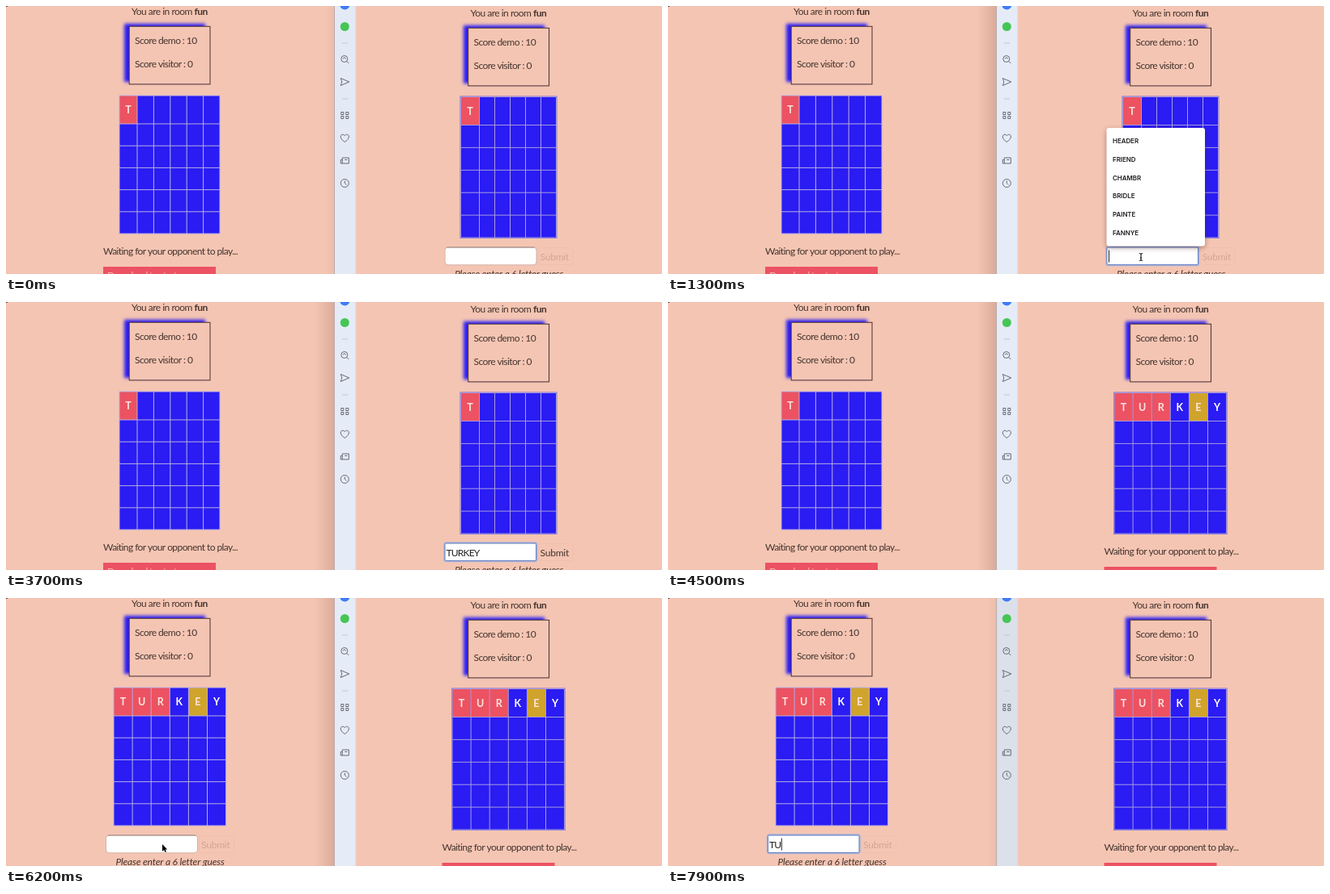
Write an HTML page with a canvas that moves like this. It is 810 by 332 pixels and loops after 8 s.

```html
<!DOCTYPE html>
<html lang="en">
<head>
<meta charset="utf-8">
<title>Word game</title>
<style>
html, body { margin: 0; width: 100%; height: 100%; overflow: hidden; background: #f5c5b3; }
canvas { display: block; }
</style>
</head>
<body>
<canvas id="stage" width="810" height="332"></canvas>
<script>
const ctx = document.getElementById('stage').getContext('2d');
const LOOP = 8000;
const BG = '#f5c5b3', BLUE = '#2a1cf2', RED = '#ec5261', GOLD = '#d0a42c', INK = '#44342f';
const WORD = 'TURKEY';
const MARKS = [RED, RED, RED, BLUE, GOLD, BLUE];
const FONT = 'Lato, "Open Sans", sans-serif';

// Times in ms: window click, key presses, guess shown
const RIGHT = {
  dx: 418.5, top: 2, dy: 5, click: 1000, solve: 4000, framed: true,
  keys: [2400, 2600, 2800, 3000, 3200, 3500],
  list: ['HEADER', 'FRIEND', 'CHAMBR', 'BRIDLE', 'PAINTE', 'FANNYE'],
  start: { x: 561.5, first: 23, col: 19 }, solved: { x: 551, first: 23.1, col: 23.1 },
  grid: { y: 112.5, first: 35, row: 27.9 },
  form: t => t < RIGHT.solve
};
const LEFT = {
  dx: 0, top: 0, dy: 0, click: 6700, solve: 4900,
  keys: [7400, 7700],
  list: ['DRIEND', 'LEAVES', 'VHGFHG', 'XUYABC', 'FRIEND', 'INTENT'],
  start: { x: 140, first: 22, col: 20.4 }, solved: { x: 133, first: 23.1, col: 23.1 },
  grid: { y: 111, first: 35, row: 27.2 },
  form: t => t >= LEFT.solve
};

function rect(x, y, w, h, color) {
  ctx.fillStyle = color;
  ctx.fillRect(x, y, w, h);
}

function text(str, x, y, { font = '12px', color = INK, gap = -0.58, align = 'left' } = {}) {
  ctx.font = `${font} ${font.includes(',') ? '' : FONT}`;
  ctx.letterSpacing = gap + 'px';
  ctx.textAlign = align;
  ctx.fillStyle = color;
  ctx.fillText(str, x, y);
  return ctx.measureText(str).width;
}

function round(x, y, w, h, r, fill, stroke, width = 1) {
  ctx.beginPath();
  ctx.roundRect(x, y, w, h, r);
  if (fill) { ctx.fillStyle = fill; ctx.fill(); }
  if (stroke) { ctx.strokeStyle = stroke; ctx.lineWidth = width; ctx.stroke(); }
}

function shadowed(color, blur, x, y, draw) {
  ctx.save();
  Object.assign(ctx, { shadowColor: color, shadowBlur: blur, shadowOffsetX: x, shadowOffsetY: y });
  draw();
  ctx.restore();
}

function header({ dx, top }) {
  ctx.save();
  ctx.translate(dx, top);
  const w = text('You are in room ', 155, 10.5, { gap: -0.5 });
  text('fun', 155 + w, 10.5, { font: 'bold 12px' });
  shadowed(BLUE, 4, -6, -3, () => rect(152, 25, 100, 72, BG));
  ctx.strokeStyle = '#4a3034';
  ctx.lineWidth = 1;
  ctx.strokeRect(152.2, 25.3, 99.8, 71.6);
  text('Score demo : 10', 159, 47);
  text('Score visitor : 0', 159, 76);
  ctx.restore();
}

function board(side, t) {
  const done = t >= side.solve;
  const { x, first, col } = done ? side.solved : side.start;
  const { y, first: head, row } = side.grid;
  const w = first + 5 * col, h = head + 5 * row;
  if (side.framed) rect(x - 1, y - 1, w + 2, h + 2, '#7a6ad0');
  rect(x, y, w, h, BLUE);
  for (let i = 0; i < 6; i++) {
    const cx = i ? x + first + (i - 1) * col : x;
    const cw = i ? col : first;
    if (done || !i) {
      rect(cx, y, cw, head, MARKS[i]);
      text(WORD[i], cx + cw / 2, y + 22, {
        font: 'bold 12.5px', color: MARKS[i] === BLUE ? '#fff' : '#fbe5df', gap: 0, align: 'center'
      });
    }
  }
  ctx.strokeStyle = side.framed ? '#a79be0' : '#b8aee2';
  ctx.lineWidth = 1;
  ctx.beginPath();
  for (let i = 0; i < 7; i++) {
    const lx = i ? x + first + (i - 1) * col : x;
    const ly = i ? y + head + (i - 1) * row : y;
    ctx.moveTo(lx, y); ctx.lineTo(lx, y + h);
    ctx.moveTo(x, ly); ctx.lineTo(x + w, ly);
  }
  ctx.stroke();
}

function waiting() {
  text('Waiting for your opponent to play...', 120, 307.5);
  rect(120, 323, 139, 20, RED);
  text('Download to start', 125, 337.5, { color: '#f5b9b5' });
}

function form(side, t) {
  const focused = t >= side.click;
  const typed = side.keys.filter(k => t >= k).length;
  const ready = typed === 6;
  if (focused) {
    round(123, 293.5, 113.5, 22.5, 2, '#fff', '#a9b3da', 2.6);
    round(123.5, 294, 112.5, 21.5, 1.5, '#fff', '#6680c0', 1);
  } else {
    round(123.5, 293.8, 113, 22, 4, '#fff', '#d3b1a6');
    rect(126, 293.5, 108, 1, '#97817b');
  }
  const w = text(WORD.slice(0, typed), 125, 309.5, { color: '#222', gap: -0.8 });
  if (focused && !ready) rect(125.5 + w, 297.5, 1, 15, '#222');
  round(238.5, 294.5, 43, 21, 2, null, 'rgba(120,60,40,.04)');
  text('Submit', 241, 309.5, { color: ready ? INK : '#d3a596', gap: -0.2 });
  text('Please enter a 6 letter guess', 202.5, 330.5, { font: 'italic 12px', gap: -0.15, align: 'center' });

  if (focused && !typed) {
    shadowed('rgba(70,30,30,.45)', 6, 0, 2, () => round(123, 146, 121.5, 146.5, 3, '#fff'));
    side.list.forEach((word, i) => text(word, 130.5, 165 + i * 22.8, {
      font: '600 7.9px Inter, "Open Sans", sans-serif', color: '#1c1c1c', gap: 0
    }));
  }
}

function panel(side, t) {
  header(side);
  board(side, t);
  ctx.save();
  ctx.translate(side.dx, side.dy);
  side.form(t) ? form(side, t) : waiting();
  ctx.restore();
}

function dot(y, r, color) {
  ctx.beginPath();
  ctx.arc(418.3, y, r, 0, 7);
  ctx.fillStyle = color;
  ctx.fill();
}

// Line icons, drawn around x = 0 at each height
const ICONS = [
  [66, 'M3.5 -.5A4 4 0 1 1 -4.5 -.5A4 4 0 1 1 3.5 -.5M2.5 2.5L5 5M-2 -.5A1.5 1.5 0 0 1 1 -.5'],
  [94, 'M-5 -4.5L5.5 0L-5 4.5L-3.5 0Z'],
  [135.5, 'M-4.5 -4h3v3h-3zM1.5 -4h3v3h-3zM-4.5 1h3v3h-3zM1.5 1h3v3h-3z'],
  [163.5, 'M0 5C-9 -1 -4 -7 0 -3C4 -7 9 -1 0 5Z'],
  [191.5, 'M-3 -3.5H5V3.5H-5V-1H-3ZM-3 -1V3.5M0 -1H3'],
  [219.5, 'M5 0A5 5 0 1 1 -5 0A5 5 0 1 1 5 0M0 -3V0L2 2']
].map(([y, d]) => [y, new Path2D(d)]);

function sidebar(t) {
  const active = t >= RIGHT.click && t < LEFT.click;
  const reach = active ? 24 : 12;
  const shade = ctx.createLinearGradient(406 - reach, 0, 406, 0);
  shade.addColorStop(0, 'rgba(90,50,40,0)');
  shade.addColorStop(1, `rgba(90,50,40,${active ? 0.18 : 0.06})`);
  rect(406 - reach, 0, reach, 332, shade);
  rect(405, 0, 1, 332, '#b9a9a7');
  rect(406, 0, 25.5, 332, active ? '#e6ecf7' : t < RIGHT.click ? '#e4eaf5' : '#dbe0ea');
  rect(431.5, 0, 1, 332, '#f1d3c8');
  dot(-1.5, 6, '#3d7bf5');
  dot(25.5, 5.5, '#45c655');
  rect(415, 45.5, 7, 1, '#c2c8d3');
  rect(415, 114.5, 7, 1, '#c2c8d3');
  ctx.strokeStyle = '#666a72';
  ctx.lineWidth = 1;
  for (const [y, path] of ICONS) {
    ctx.save();
    ctx.translate(418.3, y);
    ctx.stroke(path);
    ctx.restore();
  }
}

const ARROW = new Path2D('M0 0V9L2 7L3.6 10L5 9.2L3.6 6.4H6.2Z');
const BEAM = new Path2D('M-2 -4.5Q0 -4.5 0 -3V3Q0 4.5 -2 4.5M2 -4.5Q0 -4.5 0 -3M0 3Q0 4.5 2 4.5M-1 1H1');

function glide(t, from, to, [x0, y0], [x1, y1]) {
  const p = Math.min(1, Math.max(0, (t - from) / (to - from)));
  const e = p * p * (3 - 2 * p);
  return [x0 + (x1 - x0) * e, y0 + (y1 - y0) * e];
}

function pointer(t) {
  const toRight = t >= 300 && t < RIGHT.keys[0];
  const toLeft = t >= 5000 && t < LEFT.keys[0];
  if (!toRight && !toLeft) return;
  const [x, y] = toRight
    ? glide(t, 300, 900, [470, 345], [584, 311])
    : glide(t, 5000, 6100, [584, 311], [193, 305]);
  ctx.save();
  ctx.translate(x, y);
  if (t >= (toRight ? RIGHT : LEFT).click) {
    ctx.strokeStyle = '#111';
    ctx.lineWidth = 1.1;
    ctx.stroke(BEAM);
  } else {
    ctx.strokeStyle = '#fff';
    ctx.lineWidth = 1.2;
    ctx.stroke(ARROW);
    ctx.fillStyle = '#000';
    ctx.fill(ARROW);
  }
  ctx.restore();
}

function frame() {
  const t = performance.now() % LOOP;
  rect(0, 0, 810, 332, BG);
  rect(0, 0, 2, 1, '#5a4640');
  panel(LEFT, t);
  panel(RIGHT, t);
  sidebar(t);
  pointer(t);
  requestAnimationFrame(frame);
}
frame();
</script>
</body>
</html>
```
